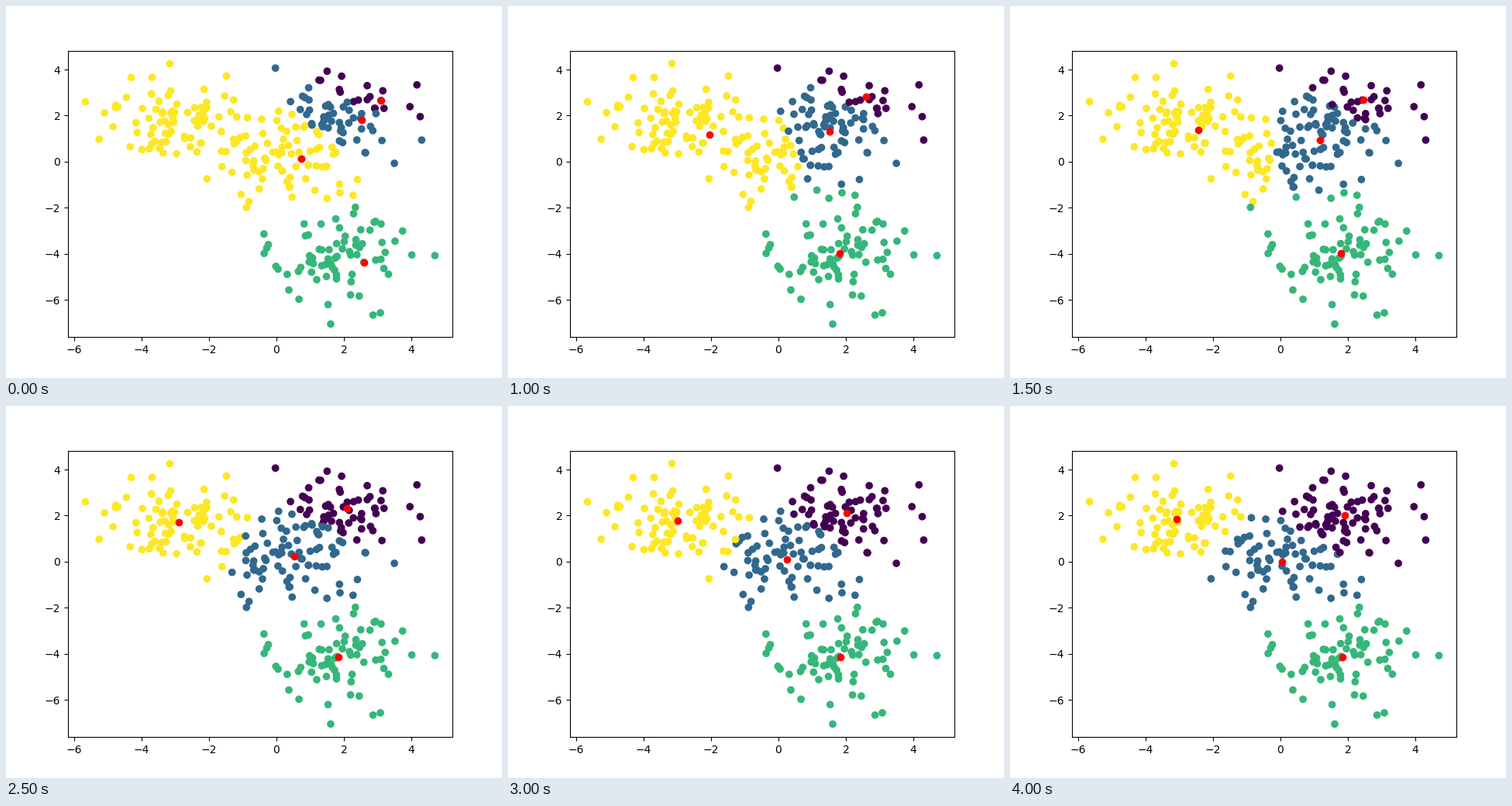
Animation, 640 px wide and 480 px high, one loop 4.5 s. Source, as a matplotlib script:

```python
import numpy as np
import matplotlib.pyplot as plt
from matplotlib.animation import FuncAnimation

STEPS = 9
INTERVAL = 500
BLOBS = [(0, 0), (2, 2), (-3, 2), (2, -4)]
PER_BLOB = 75
# Each starting centre is the data point nearest to one of these.
STARTS = [(3.103, 2.655), (2.54, 1.81), (2.60, -4.38), (0.729, 0.129)]


def make_points():
    rng = np.random.RandomState(0)
    blobs = [rng.normal(loc=c, scale=1.0, size=(PER_BLOB, 2)) for c in BLOBS]
    points = np.concatenate(blobs)
    order = np.arange(len(points))
    rng.shuffle(order)
    return points[order]


def distances(a, b):
    return np.linalg.norm(a[:, None] - b[None], axis=2)


def assign(points, centers):
    return distances(points, centers).argmin(axis=1)


def mean_centers(points, labels):
    return np.array([points[labels == k].mean(axis=0) for k in range(len(STARTS))])


def run_kmeans(points):
    """Return (centers, labels) for every step of Lloyd's algorithm."""
    centers = points[distances(np.array(STARTS), points).argmin(axis=1)]
    labels = assign(points, centers)
    steps = [(centers, labels)]
    while len(steps) < STEPS:
        centers = mean_centers(points, labels)
        steps.append((centers, labels))
        labels = assign(points, centers)
    return steps


points = make_points()
steps = run_kmeans(points)

fig, ax = plt.subplots(figsize=(6.4, 4.8), dpi=100)
dots = ax.scatter(points[:, 0], points[:, 1], c=steps[0][1], cmap="viridis")
marks = ax.scatter(steps[0][0][:, 0], steps[0][0][:, 1], c="r")


def update(i):
    centers, labels = steps[i]
    dots.set_array(labels)
    marks.set_offsets(centers)
    return dots, marks


anim = FuncAnimation(fig, update, frames=STEPS, interval=INTERVAL,
                     repeat=True, repeat_delay=0)
plt.show()
```
